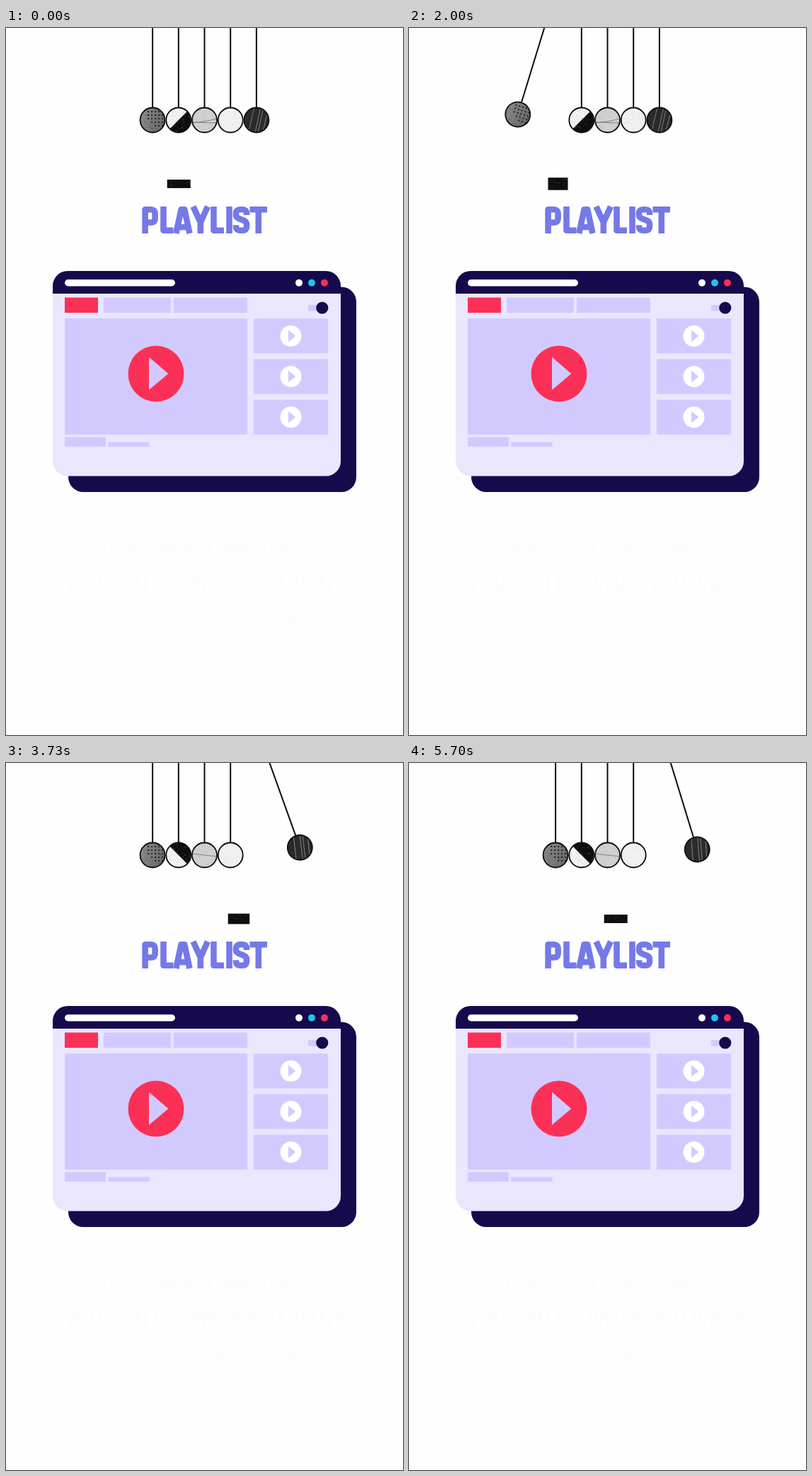
An HTML page for the animation above (5730 ms loop, 561 by 998 pixels).

```html
<!DOCTYPE html>
<html lang="en">
<head>
<meta charset="utf-8">
<title>Playlist</title>
<style>
  html, body { margin: 0; width: 100%; height: 100%; overflow: hidden; background: #fefefe; }
  svg { display: block; width: 100%; height: 100%; }
  .navy { fill: #170a4c; }
  .red { fill: #fb3056; }
  .lilac { fill: #d2caff; }
  .white { fill: #fff; }
  .faint { fill: #fcfcfc; font-family: Roboto, "Open Sans", sans-serif; font-weight: 700; text-anchor: middle; }
  .lettering { fill: none; stroke: #7579e7; stroke-width: 8.6; stroke-linejoin: round; }
  .string { stroke: #0c0c0c; stroke-width: 2; }
  .rim { fill: none; stroke: #0c0c0c; stroke-width: 1.8; }
  .thin { fill: none; stroke-width: .8; }
</style>
</head>
<body>
<svg viewBox="0 0 561 998" xmlns="http://www.w3.org/2000/svg">
  <defs>
    <linearGradient id="shade" x1="0" y1="0" x2="1" y2=".3">
      <stop offset="0" stop-color="#8c8c8c"/>
      <stop offset="1" stop-color="#6c6c6c"/>
    </linearGradient>
    <clipPath id="disc"><circle r="17.5"/></clipPath>
  </defs>

  <g id="cradle"></g>
  <g id="block">
    <rect id="slab" fill="#0d0d0d"/>
    <path id="slabGrain" class="thin" stroke="#333"/>
  </g>

  <g class="lettering" role="img" aria-label="PLAYLIST">
    <text x="280.5" y="290" font-family="Roboto, sans-serif" font-size="40" text-anchor="middle" stroke="none">PLAYLIST</text>
    <path d="M196.6 290V256.3H205q5.6 0 5.6 5.6v7q0 5.6-5.6 5.6H196.6"/>
    <path d="M222.5 252V285.7H236.5"/>
    <path d="M240.3 290L247.5 256.3H252.3L259.5 290M243 281H257"/>
    <path d="M264.5 252L274.8 274.5L285 252M274.8 274V290"/>
    <path d="M293.5 252V285.7H308"/>
    <path d="M315.5 252V290"/>
    <path d="M340 264v-2q0-5.7-5.5-5.7h-4q-5.5 0-5.5 5.5v1.8q0 4 4 5.4l7 2.8q4 1.5 4 5.5v2.6q0 5.8-5.5 5.8h-4q-5.5 0-5.5-5.5v-2"/>
    <path d="M344.5 256.3H369M356.8 256V290"/>
  </g>

  <g id="window">
    <rect class="navy" x="88" y="365.5" width="407" height="289.5" rx="21"/>
    <rect x="66" y="343" width="407" height="289.5" rx="21" fill="#eae6fe"/>
    <path class="navy" d="M66 375V364a21 21 0 0 1 21-21H452a21 21 0 0 1 21 21V375z"/>
    <rect class="white" x="83" y="355" width="156" height="9.5" rx="4.7"/>
    <circle class="white" cx="414" cy="359.8" r="5"/>
    <circle cx="432" cy="359.8" r="5" fill="#1fc3f3"/>
    <circle class="red" cx="450" cy="359.8" r="5"/>
    <rect class="red" x="83" y="380.5" width="47" height="21.5"/>
    <path class="lilac" d="M138 380.5h95V402h-95zM237 380.5h104V402h-104zM427 391h14v8.5h-14zM83 410h258v164h-258zM83 577.5h58V591h-58zM144.5 584.5h58v6.5h-58z"/>
    <circle class="navy" cx="446.8" cy="395" r="8.6"/>
    <circle class="red" cx="212" cy="488" r="39.5"/>
    <path class="lilac" d="M202 464.5L229.3 488L202 511z"/>
  </g>

  <g class="faint">
    <text x="280.5" y="741" font-size="18">TODAY IS MADE OF SMALL THINGS</text>
    <text x="280.5" y="795" font-size="28">YOU CAN DO WHAT YOU WANT</text>
    <text x="280.5" y="846" font-size="18">THAT IS WHY THIS WILL BE YOURS</text>
  </g>
</svg>

<script>
const LOOP = 5730;
const HALF = 12;                          // steps of one ball's swing
const STEP_STARTS = [0, 70, 100, 130, 170];  // five steps in each 200 ms
const CENTER = 280.5, GAP = 36.7, REST_Y = 130, ROPE = 182;
const PIVOT_Y = REST_Y - ROPE;
const MAX_ANGLE = 21.75;
// block offset from the centre, towards the raised ball
const BLOCK_PATH = [36.3, 55.5, 70, 76.8, 80.2, 81.2, 80, 75.5, 67, 48.5, 11.7, -15];

const byId = id => document.getElementById(id);

function add(parent, tag, attrs) {
  const node = document.createElementNS("http://www.w3.org/2000/svg", tag);
  for (const key in attrs) node.setAttribute(key, attrs[key]);
  parent.appendChild(node);
  return node;
}

function random(seed) {
  let s = seed * 7919 + 17;
  return () => {
    s = (s * 16807 + 11) % 2147483647;
    return s / 2147483647;
  };
}

function grain(seed, count, width, height) {
  const next = random(seed);
  next();
  let d = "";
  for (let i = 0; i < count; i++) {
    d += `M${((next() - .5) * width).toFixed(1)} ${((next() - .5) * height).toFixed(1)}h1`;
  }
  return d;
}

function dotGrid() {
  let d = "";
  for (let row = 0; row < 5; row++) {
    for (let col = 0; col < 5; col++) {
      if (row - col < 3) d += `M${-7 + col * 5} ${-12 + row * 5}h2`;
    }
  }
  return d;
}

const balls = [
  { fill: "url(#shade)", speck: "#333", mark: { d: dotGrid(), fill: "none", stroke: "#222", "stroke-width": 2 } },
  { fill: "#f2f2f2", speck: "#999", mark: { d: "M-14 14L14 -14L22 22z", fill: "#0d0d0d" } },
  { fill: "#d0d0d0", speck: "#999", mark: { fill: "none", stroke: "#777", "stroke-width": .9 } },
  { fill: "#f0f0f0", speck: "#ccc" },
  { fill: "#2b2b2b", speck: "#111", mark: { d: "M-11 16L-3 -18M-2 18L6 -18M2 18L10 -18M9 16L15 -8", fill: "none", stroke: "#8a8a8a", "stroke-width": .9 } }
];

balls.forEach((ball, i) => {
  ball.x = CENTER + (i - 2) * GAP;
  ball.arm = add(byId("cradle"), "g", {});
  add(ball.arm, "line", { class: "string", x1: ball.x, x2: ball.x, y1: PIVOT_Y, y2: REST_Y - 18 });
  const body = add(ball.arm, "g", { transform: `translate(${ball.x} ${REST_Y})` });
  const inside = add(body, "g", { "clip-path": "url(#disc)" });
  add(inside, "circle", { r: 17.5, fill: ball.fill });
  if (ball.mark) ball.markNode = add(inside, "path", ball.mark);
  ball.grainNode = add(inside, "path", { class: "thin", stroke: ball.speck, opacity: .5 });
  add(body, "circle", { class: "rim", r: 17.5 });
});

for (const y of [434.8, 492, 549.3]) {
  add(byId("window"), "rect", { class: "lilac", x: 350, y: y - 24.6, width: 105, height: 49.2 });
  add(byId("window"), "circle", { class: "white", cx: 402.5, cy: y, r: 15 });
  add(byId("window"), "path", { class: "lilac", d: `M399 ${y - 8.3}l10.3 8.3l-10.3 8.3z` });
}

function stepAt(ms) {
  const rest = ms % 200;
  return 5 * Math.floor(ms / 200) + STEP_STARTS.filter(start => rest >= start).length - 1;
}

function swing(phase) {
  const p = Math.min(phase, HALF - phase);
  return MAX_ANGLE * (1 - Math.exp(-.715 * p - .025 * p * p));
}

function draw(step) {
  const phase = step % HALF;
  const left = step % (2 * HALF) < HALF;
  const side = left ? -1 : 1;

  balls.forEach((ball, i) => {
    const raised = i === (left ? 0 : 4);
    const angle = raised ? -side * swing(phase) : 0;
    ball.arm.setAttribute("transform", `rotate(${angle} ${ball.x} ${PIVOT_Y})`);
    ball.grainNode.setAttribute("d", grain(step * 5 + i + 1, 70, 35, 35));
  });
  balls[1].markNode.setAttribute("transform", `scale(1 ${-side})`);
  balls[2].markNode.setAttribute("d", left ? "M-18 3L18 4M-18 4Q0 3 18 -2" : "M-18 -2L18 2");

  // the block is flattest one step before a ball leaves
  const distance = Math.min(Math.abs(phase - 11), phase + 1);
  const squash = Math.max(0, 5 - distance);
  const width = 23 + 2.5 * squash, height = 23 - 2.75 * squash;
  byId("block").setAttribute("transform", `translate(${CENTER + side * BLOCK_PATH[phase]} 220)`);
  const slab = { x: -width / 2, y: -height / 2, width, height };
  for (const key in slab) byId("slab").setAttribute(key, slab[key]);
  byId("slabGrain").setAttribute("d", grain(step + 900, 40, width - 3, height - 2));
}

let shown = -1;
const begin = performance.now();
function tick() {
  const step = stepAt((performance.now() - begin) % LOOP);
  if (step !== shown) draw(shown = step);
  requestAnimationFrame(tick);
}
tick();
</script>
</body>
</html>
```
